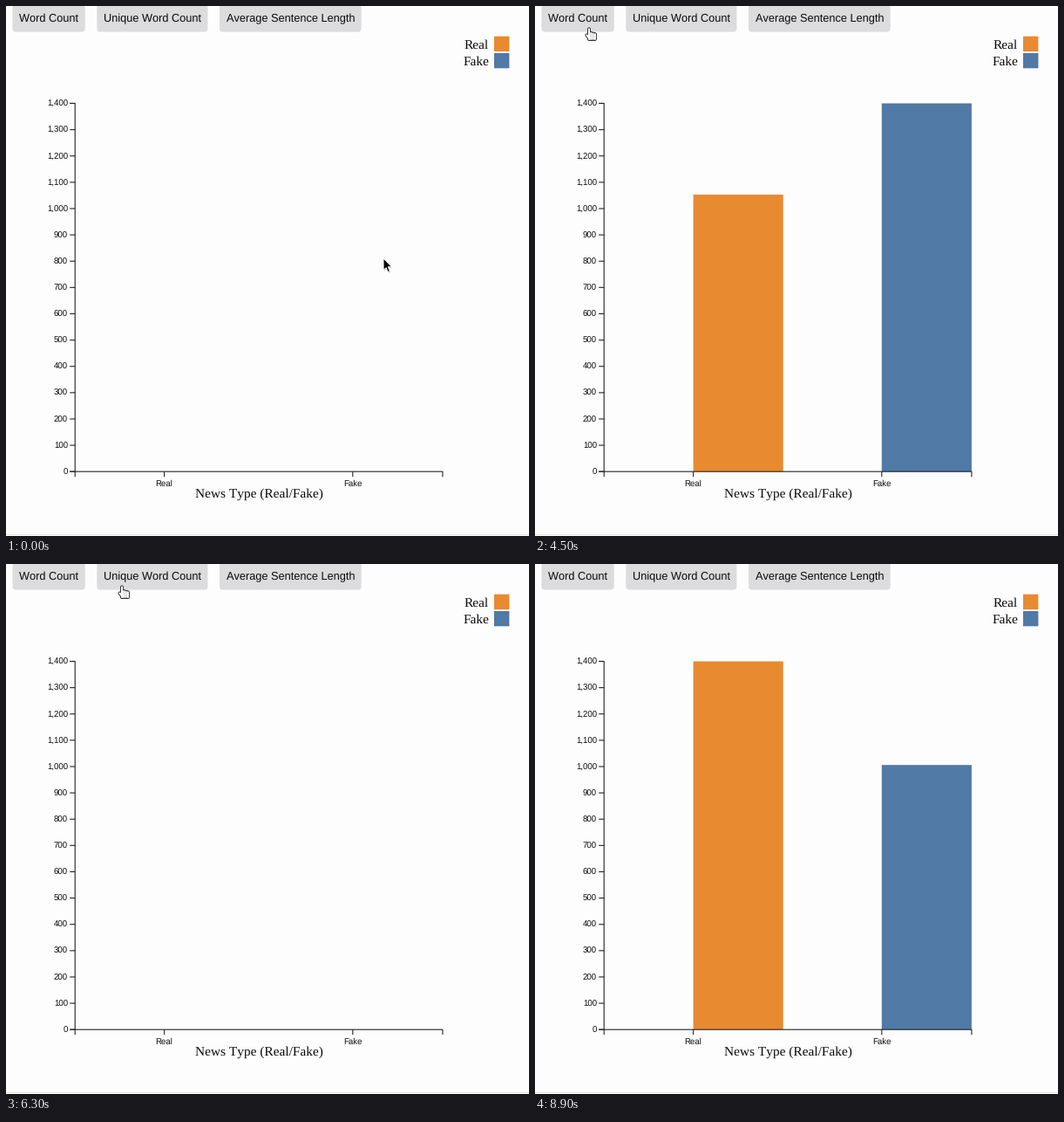
Recreate the animation shown at these times as a matplotlib script. Size 600x607 px, loop 9.45 s.

```python
import numpy as np
import matplotlib.pyplot as plt
from matplotlib.animation import FuncAnimation
from matplotlib.patches import FancyBboxPatch, Polygon, Rectangle

# A coarse kerning factor leaves the digits evenly spaced
plt.rcParams.update({"text.hinting": "none", "text.kerning_factor": 6,
                     "toolbar": "None"})

W, H, DPI = 600, 607, 100
STEP, LOOP = 50, 9450
PT = 72 / DPI
SANS, SERIF = "Liberation Sans", "Liberation Serif"
INK = "#222222"
COLORS = {"Real": "#e88a30", "Fake": "#5079a6"}
LEFT, RIGHT, TOP, BASE = 79.2, 500.9, 111.5, 533.2
Y_MAX, TICK, BAND = 1400, 6, 216.2

fig = plt.figure(figsize=(W / DPI, H / DPI), dpi=DPI, facecolor="#fefdfe")
ax = fig.add_axes([0, 0, 1, 1])
ax.set_xlim(0, W)
ax.set_ylim(H, 0)
ax.axis("off")


def label(x, y, s, size, font, ha="center"):
    return ax.text(x, y, s, fontsize=size * PT, family=font, ha=ha,
                   va="baseline", color="#0a0a0a", zorder=4)


def line(xs, ys, color=INK, z=3):
    ax.plot(xs, ys, color=color, lw=1.1 * PT, snap=False, zorder=z,
            solid_capstyle="butt", solid_joinstyle="miter")


def box(x, y, w, h, color):
    return ax.add_patch(Rectangle((x, y), w, h, fc=color, lw=0, snap=False,
                                  zorder=2))


def scale(value):
    return (BASE - TOP) * value / Y_MAX


# Buttons, each as wide as its text
buttons = []
x = 7.5
for name in ("Word Count", "Unique Word Count", "Average Sentence Length"):
    text = label(x + 7.6, 18.3, name, 12.8, SANS, "left")
    w = text.get_window_extent().width + 15.2
    ax.add_patch(FancyBboxPatch((x, -2), w, 31.6, fc="#dcdbdd", lw=0, zorder=2,
                                boxstyle="round,pad=0,rounding_size=4"))
    buttons.append((x, x + w))
    x += w + 13.5

# Axes
line([LEFT - TICK, LEFT, LEFT, LEFT - TICK], [TOP, TOP, BASE, BASE])
line([LEFT, LEFT, RIGHT, RIGHT], [BASE + TICK, BASE, BASE, BASE + TICK])
for value in range(0, Y_MAX + 1, 100):
    y = BASE - scale(value)
    line([LEFT - TICK, LEFT], [y, y])
    label(70.9, y + 3.5, f"{value:,}", 9.65, SANS, "right")
label(290, 563, "News Type (Real/Fake)", 15.35, SERIF)
line([0, W], [605.5, 605.5], "#e4e3e6", 1)

# Legend, category ticks and bars
bars = []
for k, (name, color) in enumerate(COLORS.items()):
    y = 34.7 + 19.2 * k
    box(560, y, 17.4, 17.4, color)
    label(554.2, y + 14.3, name, 15.35, SERIF, "right")
    x = 181.6 + BAND * k
    line([x, x], [BASE, BASE + TICK])
    label(x, 549.8, name, 9.65, SANS)
    bars.append(box(x, BASE, 103.1, 0, color))


def make_arrow(tilt=np.radians(22.5)):
    """Half an arrow along its axis, mirrored and tilted."""
    half = np.array([(0, 0), (12.6, 5.1), (11.1, 1.2), (16.4, 1.2)])
    along, side = np.vstack([half, half[:0:-1] * (1, -1)]).T
    c, s = np.cos(tilt), np.sin(tilt)
    return np.column_stack([along * s + side * c, along * c - side * s])


def make_hand():
    """Strokes of one long finger, three folded ones and a thumb."""
    gap = (np.nan, np.nan)
    pts = []
    for k in range(4):
        top = 5.6 + .6 * k if k else 1.6
        pts += [(2.3 * k, top), (2.3 * k, 13.2), gap]
    return np.array(pts + [(-2.6, 8.6), (.6, 12.6)])


ARROW, HAND = make_arrow(), make_hand()
shadow = ax.add_patch(Polygon(ARROW, fc="black", alpha=.18, lw=0, zorder=5))
arrow = ax.add_patch(Polygon(ARROW, fc="black", ec="white", lw=.9 * PT,
                             joinstyle="round", zorder=6))
hand = [ax.plot([], [], color=c, lw=w * PT, solid_capstyle="round",
                zorder=z)[0]
        for c, w, z in (("#2b2b2b", 4, 6), ("white", 2.1, 7))]

# Clicks: time and the two values shown afterwards
GROW, DELAY = 510, 40
CLICKS = [(2140, 1053, 1400), (4680, 1400, 993), (6250, 1400, 1006)]

# Stops of the pointer: departure, arrival, place
START = (433, 289)
HOVER_Y = 24.8
STOPS = [(200, 800, (321, HOVER_Y)), (3200, 3800, (62, HOVER_Y)),
         (4850, 5250, (133, HOVER_Y)), (7300, 7400, (149, 110)),
         (7950, 8300, (640, 290))]


def cubic(u):
    u = np.clip(u, 0, 1)
    return 4 * u ** 3 if u < .5 else 1 - 4 * (1 - u) ** 3


def heights(t):
    now = np.zeros(2)
    for click, *values in CLICKS:
        if t >= click:
            grown = cubic((t - click - DELAY) / GROW)
            now = scale(np.array(values)) * grown
    return now


def pointer(t):
    pos = np.array(START, float)
    for t0, t1, place in STOPS:
        u = np.clip((t - t0 + STEP) / (t1 - t0 + STEP), 0, 1)
        pos += (place - pos) * u * u * (3 - 2 * u)
    return pos


def draw(i):
    t = i * STEP
    for bar, h in zip(bars, heights(t)):
        bar.set_y(BASE - h)
        bar.set_height(h)
        bar.set_visible(h > .5)

    p = pointer(t)
    over = p[1] < 29.6 and any(a <= p[0] <= b for a, b in buttons)
    arrow.set_xy(ARROW + p)
    shadow.set_xy(ARROW + p + (.8, 1.4))
    for layer in hand:
        layer.set_data(*(HAND + p).T)
        layer.set_visible(over)
    arrow.set_visible(not over)
    shadow.set_visible(not over)
    return [*bars, shadow, arrow, *hand]


anim = FuncAnimation(fig, draw, frames=LOOP // STEP, interval=STEP,
                     init_func=lambda: draw(0), repeat=True, repeat_delay=0,
                     blit=False)
plt.show()
```
